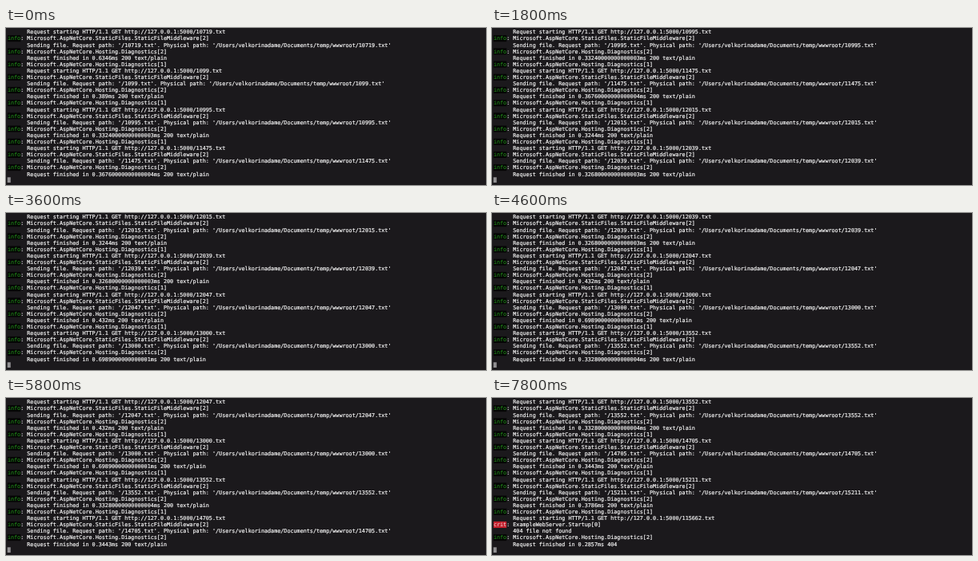
Animation, 600 px wide and 197 px high, one loop 8000 ms. Source, as an HTML page:

```html
<!DOCTYPE html>
<html lang="en">
<head>
<meta charset="utf-8">
<title>Server log</title>
<style>
  html, body { margin: 0; width: 100%; height: 100%; overflow: hidden; background: #1b191c; }
  svg { display: block; width: 100%; height: 100%; }
  text {
    font: 6.755px "DejaVu Sans Mono", "Liberation Mono", monospace;
    text-rendering: geometricPrecision;
    fill: #f4f4f4;
    stroke: #f4f4f4;
    stroke-width: .2px;
  }
  .info { fill: #25a01c; stroke: none; }
  .crit { fill: #f6e4e4; stroke: none; }
</style>
</head>
<body>
<svg id="stage" viewBox="0 0 600 197"></svg>
<script>
const LOOP = 8000, LEFT = 1.9, TOP = 1, CELL = 4.067, LINE = 8.1, ROWS = 23;
const STEPS = [400, 1800, 2600, 3600, 4600, 5600, 6600, 7800];
const ROOT = '/Users/velkorinadame/Documents/temp/wwwroot';
const HOSTING = 'Microsoft.AspNetCore.Hosting.Diagnostics';
const STATIC = 'Microsoft.AspNetCore.StaticFiles.StaticFileMiddleware';
const TAG_FILL = { info: '#050505', crit: '#c3202d' };

// file number and response time; the last one is missing on disk
const requests = [
  ['10719', '0.6346'], ['1099', '0.389'], ['10995', '0.33240000000000003'],
  ['11475', '0.36760000000000004'], ['12015', '0.3244'], ['12039', '0.32680000000000003'],
  ['12047', '0.432'], ['13000', '0.6989000000000001'], ['13552', '0.33280000000000004'],
  ['14705', '0.3443'], ['15211', '0.3786'], ['115662', '0.2857', true]
];

const log = requests.flatMap(([id, ms, missing]) => {
  const file = `/${id}.txt`;
  return [
    ['info', `${HOSTING}[1]`],
    ['', `Request starting HTTP/1.1 GET http://127.0.0.1:5000${file}`],
    ...(missing
      ? [['crit', 'ExampleWebServer.Startup[0]'], ['', '404 file not found']]
      : [['info', `${STATIC}[2]`],
         ['', `Sending file. Request path: '${file}'. Physical path: '${ROOT}${file}'`]]),
    ['info', `${HOSTING}[2]`],
    ['', `Request finished in ${ms}ms ${missing ? '404' : '200 text/plain'}`]
  ];
});
const PER_REQUEST = log.length / requests.length;

const stage = document.getElementById('stage');

function add(name, attrs) {
  const node = document.createElementNS('http://www.w3.org/2000/svg', name);
  for (const key in attrs) node.setAttribute(key, attrs[key]);
  return stage.appendChild(node);
}

const rows = Array.from({ length: ROWS }, (_, i) => {
  const y = TOP + i * LINE;
  const cell = col => add('text', { x: LEFT + col * CELL, y: y + 6.35 });
  const box = add('rect', { x: LEFT, y, width: 4 * CELL, height: LINE });
  return { box, tag: cell(0), colon: cell(4), body: cell(6) };
});
add('rect', { x: LEFT - .2, y: TOP + ROWS * LINE, width: CELL, height: 6.7, fill: '#929193' });

let shown = -1;

// each step scrolls the log by one request; the top row is a "Request starting" line
function draw(t) {
  const step = STEPS.filter(at => at <= t).length;
  if (step === shown) return;
  shown = step;
  const start = step * PER_REQUEST + 1;
  rows.forEach(({ box, tag, colon, body }, i) => {
    const [level, message] = log[start + i];
    box.setAttribute('fill', TAG_FILL[level] || 'none');
    tag.setAttribute('class', level);
    tag.textContent = level;
    colon.textContent = level && ':';
    body.textContent = message;
  });
}

const begin = performance.now();
function tick() {
  draw((performance.now() - begin) % LOOP);
  requestAnimationFrame(tick);
}
draw(0);
requestAnimationFrame(tick);
</script>
</body>
</html>
```
